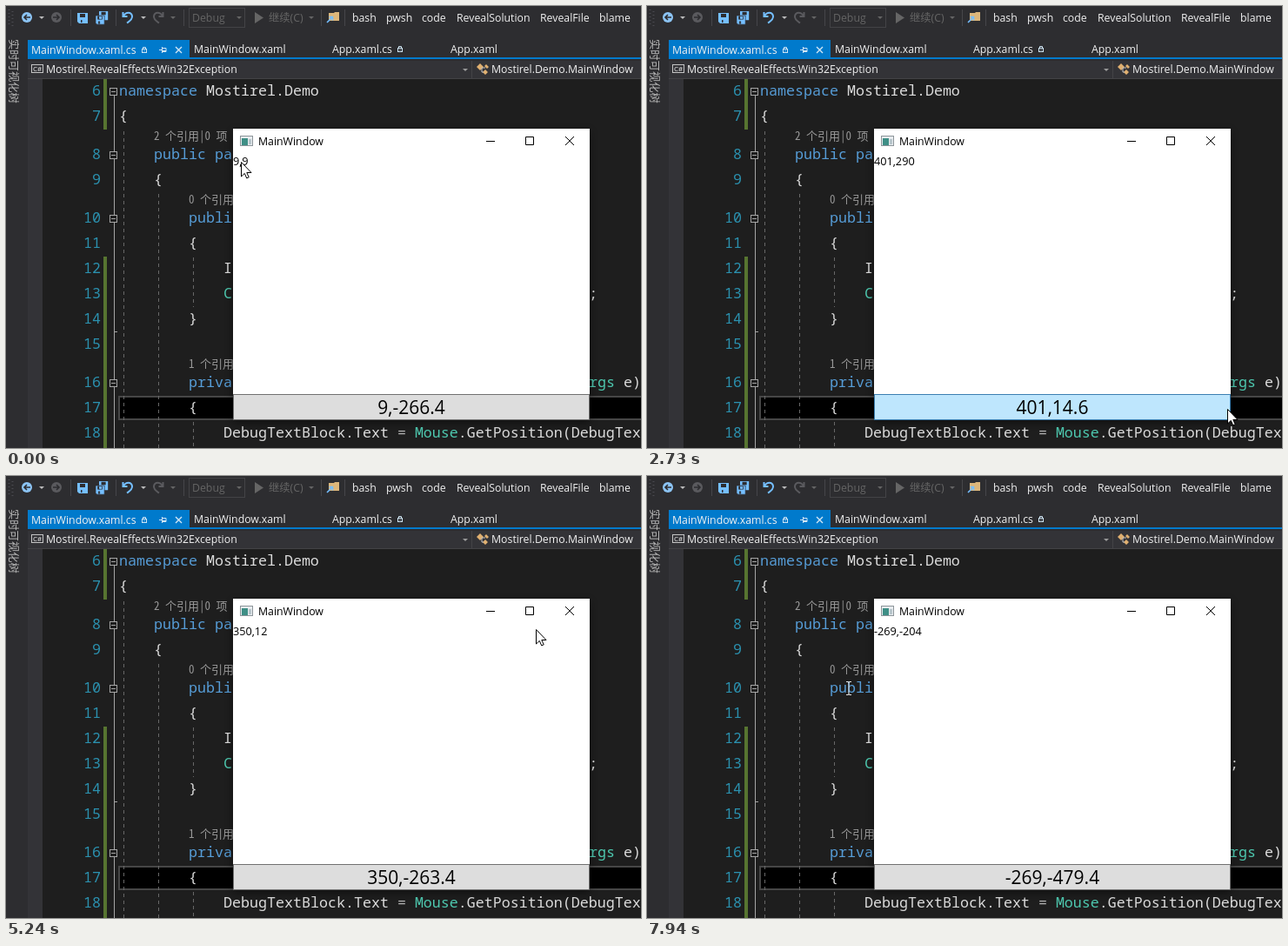
An HTML page for the animation above (8000 ms loop, 730 by 508 pixels).

```html
<!DOCTYPE html>
<html lang="zh-CN">
<head>
<meta charset="utf-8">
<title>Mouse position demo</title>
<style>
html, body { margin: 0; width: 100%; height: 100%; overflow: hidden; background: #2d2d30; }
svg { display: block; }
text { white-space: pre; }
.ui { font: 12.3px "Open Sans", "Noto Sans CJK SC", "Noto Sans CJK", sans-serif; fill: #f1f1f1; }
.code { font: 16.67px "Noto Sans Mono", "DejaVu Sans Mono", monospace; fill: #dcdcdc; }
.lens { font: 13px "Noto Sans Mono CJK SC", "Noto Sans CJK SC", "Noto Sans CJK", monospace; fill: #999; }
.num { fill: #2b91af; text-anchor: end; }
.kw { fill: #569cd6; }
.type { fill: #4ec9b0; }
.op { fill: #b4b4b4; }
.off { fill: #656565; }
.dark { fill: #000; }
.line { fill: none; stroke: #000; }
.pale { fill: none; stroke: #d0e6f5; }
#small { font-size: 12.7px; }
#big { font-size: 21px; text-anchor: middle; }
</style>
</head>
<body>
<svg width="730" height="508" viewBox="0 0 730 508">
  <defs>
    <path id="drop" d="M0 0h6l-3 3z"/>
    <path id="disk" d="M0 0h12v12h-10l-2-2zM3 1v4h6v-4zM4 8v3h1.500v-3z" fill-rule="evenodd"/>
    <g id="lock" class="pale"><rect x=".5" y="3.5" width="5" height="4"/><path d="M1.500 3.500v-2h3v2M3 5v1"/></g>
    <g id="fold" stroke="#a5a5a5" fill="#1e1e1e"><rect x="119.500" y="-4.500" width="8" height="8"/><path d="M121 -.500h5"/></g>
    <filter id="shade" x="-10%" y="-10%" width="120%" height="120%"><feGaussianBlur stdDeviation="5"/></filter>
  </defs>

  <rect width="730" height="508" fill="#2d2d30"/>

  <!-- toolbar -->
  <path d="M3.500 4v19M7.500 6v19" stroke="#4b4b50" stroke-width="2" stroke-dasharray="1 3"/>
  <circle cx="24" cy="13" r="6" fill="#8cc4f5"/>
  <path d="M28 13h-7M24 10l-3 3 3 3" fill="none" stroke="#2d2d30" stroke-width="1.600"/>
  <circle cx="58" cy="13" r="6" fill="#5a5a5e"/>
  <path d="M54 13h7M58 10l3 3-3 3" fill="none" stroke="#2d2d30" stroke-width="1.600"/>
  <path d="M74.500 4v19M126.500 4v19M204.500 4v19M362.500 4v19M389.500 4v19" stroke="#46464a"/>
  <g fill="#75bfff">
    <use href="#disk" x="82" y="8"/>
    <use href="#disk" transform="translate(107 6) scale(.85)"/>
    <use href="#disk" transform="translate(103 11) scale(.85)" stroke="#2d2d30" stroke-width=".8"/>
  </g>
  <g fill="none" stroke-width="2">
    <path d="M134.500 7v5h5M135 11.500c3-5 9-5 10 0c.6 4-3 6-6 8" stroke="#75bfff"/>
    <path d="M180.500 7v5h-5M180 11.500c-3-5-9-5-10 0c-.6 4 3 6 6 8" stroke="#5a5a5e"/>
  </g>
  <g fill="#bbb">
    <use href="#drop" x="38" y="12"/><use href="#drop" x="155" y="12"/>
  </g>
  <g fill="#656565">
    <use href="#drop" x="189" y="12"/><use href="#drop" x="265" y="12"/><use href="#drop" x="348" y="12"/>
    <path d="M286 7v13l10-6.500z"/>
  </g>
  <rect x="210.500" y="2.500" width="64" height="22" fill="none" stroke="#434346"/>
  <path d="M371 8h6l1-1h5v10h-12z" fill="#dcb67a"/>
  <path d="M369 19l6-6M371.500 12.500h4v4" fill="none" stroke="#75bfff" stroke-width="1.600"/>
  <g class="ui">
    <text class="off" x="214" y="18">Debug</text><text class="off" x="302" y="18">继续(C)</text>
    <text x="398" y="18">bash</text><text x="437" y="18">pwsh</text><text x="478" y="18">code</text>
    <text x="518" y="18">RevealSolution</text><text x="614" y="18">RevealFile</text><text x="682" y="18">blame</text>
  </g>

  <!-- tabs and navigation bar -->
  <path d="M25 39h186v20h519v2h-705z" fill="#007acc"/>
  <g class="ui">
    <text x="29" y="54.500">MainWindow.xaml.cs</text><text x="216" y="54">MainWindow.xaml</text>
    <text x="375" y="54">App.xaml.cs</text><text x="511" y="54">App.xaml</text>
  </g>
  <use href="#lock" x="156" y="46"/><use href="#lock" x="450" y="45"/>
  <path class="pale" d="M176 50.500h3M179.500 47v7M180 48.500h4v4h-4M180 51.500h4"/>
  <path class="pale" d="M195 47l7 7M202 47l-7 7" stroke-width="1.400"/>
  <rect x="25" y="63" width="705" height="21" fill="#333337"/>
  <path d="M25 83.500h705M535.500 63v20" stroke="#434346"/>
  <rect x="29.500" y="67.500" width="13" height="9" fill="none" stroke="#c5c5c5"/>
  <text x="31" y="75" class="ui" style="font-size:8px">C#</text>
  <g class="ui"><text x="46" y="77">Mostirel.RevealEffects.Win32Exception</text><text x="558" y="77">Mostirel.Demo.MainWindow</text></g>
  <use href="#drop" x="525" y="72" fill="#999"/>
  <path d="M541 70l4-4 4 4-4 4zM548 76l3-3 3 3-3 3zM550 69l2-2 3 3-2 2z" fill="#e0b070"/>
  <path d="M547 71h4M547 71v5h2" fill="none" stroke="#c5c5c5"/>
  <text class="ui" transform="translate(4 38) rotate(90)" style="fill:#b8b8b8">实时可视化树</text>

  <!-- editor -->
  <rect x="25" y="84" width="17" height="424" fill="#333337"/>
  <rect x="42" y="84" width="688" height="424" fill="#1e1e1e"/>
  <path d="M112 84h4v58h-4zM112 288h4v220h-4z" fill="#577430"/>
  <rect x="130" y="449" width="620" height="26" fill="#000" stroke="#464646" stroke-width="2"/>
  <path d="M124.500 97v411M124 374.500h4" stroke="#a5a5a5"/>
  <use href="#fold" y="99"/><use href="#fold" y="172"/><use href="#fold" y="245"/><use href="#fold" y="434"/>
  <path d="M135.500 144v364M175.500 216v292M215.500 289v57M215.500 478v30" stroke="#686868" stroke-dasharray="4 4"/>
  <g id="nums" class="code"></g>
  <g class="code">
    <text x="130" y="103"><tspan class="kw">namespace</tspan> Mostirel.Demo</text>
    <text x="130" y="132">{</text>
    <text x="170" y="176" class="kw">public partial</text>
    <text x="170" y="205">{</text>
    <text x="210" y="249" class="kw">public</text>
    <text x="210" y="278">{</text>
    <text x="250" y="307">InitializeComponent</text>
    <text x="250" y="336" class="type">CompositionTarget</text><text x="670" y="336">;</text>
    <text x="210" y="365">}</text>
    <text x="210" y="438" class="kw">private</text>
    <text x="670" y="438"><tspan class="type">rgs</tspan> e)</text>
    <text x="210" y="467">{</text>
    <text x="250" y="496">DebugTextBlock.Text <tspan class="op">=</tspan> <tspan class="type">Mouse</tspan>.GetPosition(DebugTextBlock</text>
  </g>
  <g class="lens">
    <text x="170" y="154">2 个引用|0 项</text><text x="210" y="227">0 个引用</text><text x="210" y="416">1 个引用</text>
  </g>
  <rect id="caret" x="220" y="448" width="1" height="28" fill="#fff"/>

  <!-- demo window -->
  <rect x="261" y="144" width="410" height="335" fill="#000" opacity=".45" filter="url(#shade)"/>
  <rect x="261" y="141" width="410" height="335" fill="#fff"/>
  <rect id="maxBg" x="580" y="141" width="46" height="29" fill="#e5e5e5"/>
  <rect id="closeBg" x="626" y="141" width="45" height="29" fill="#e81123"/>
  <rect x="269.500" y="149.500" width="14" height="11" fill="#e8ecef" stroke="#8c9499"/>
  <rect x="271" y="152" width="7" height="8" fill="#3f8f86"/>
  <path d="M279 153h3v6h-3z" fill="#b9c6cc"/>
  <text class="ui dark" x="290" y="160">MainWindow</text>
  <path class="line" d="M552 155.500h10M597.500 150.500h9v9h-9z"/>
  <path id="cross" class="line" d="M643 150l10 10M653 150l-10 10"/>
  <text id="small" class="ui dark" x="261" y="183"></text>
  <rect id="button" x="261.500" y="446.500" width="409" height="29"/>
  <text id="big" class="ui dark" x="466" y="469"></text>

  <g id="pointer">
    <path id="arrow" d="M.500 .500V17l3.800-3.600 2.400 5.500 2.500-1.100-2.400-5.300h5.200z" fill="#fff" stroke="#000"/>
    <path id="resize" d="M-10.500 .5l4.500-4.500v3.500h12v-3.500l4.500 4.500-4.500 4.500v-3.500h-12v3.500z" fill="#fff" stroke="#000"/>
    <path id="beam" d="M-3 -7.500h2.500l.500 1 .500-1h2.500M-3 7.500h2.500l.500-1 .500 1h2.500M0 -7v14" fill="none" stroke="#e4e4e4"/>
  </g>
</svg>
<script>
const LOOP = 8000, LAG = 75, BLINK = 524, BLINK_START = 65;
const WIN = { left: 261, top: 141, client: 170, right: 671, bottom: 476 };
const $ = id => document.getElementById(id);
const show = (id, on) => $(id).setAttribute('visibility', on ? 'visible' : 'hidden');

// time, x, y of the pointer's hot spot
const path = [
  [0, 270, 179], [230, 270, 179], [700, 322, 232], [1195, 380, 287], [1270, 389, 295],
  [1560, 465, 340], [1870, 586, 405], [2195, 634, 432], [2270, 636, 434], [2730, 667, 463],
  [2820, 673, 465], [3170, 673, 465], [3280, 674, 450], [3400, 674, 450], [3840, 675, 409],
  [3980, 668, 400], [4220, 653, 370], [4700, 632, 262], [5165, 611, 182], [5240, 609, 176],
  [5470, 614, 156], [5800, 614, 156], [6300, 647, 155], [6640, 647, 155], [7000, 610, 178],
  [7300, 500, 205], [7470, 410, 222], [7720, 290, 240], [7900, 232, 244], [8000, 232, 244]
];

const slope = (i, k) => (path[i + 1][k] - path[i][k]) / (path[i + 1][0] - path[i][0]);

// Harmonic mean of the neighbouring slopes: smooth, never overshoots.
function tangent(i, k) {
  if (i === 0 || i === path.length - 1) return 0;
  const a = slope(i - 1, k), b = slope(i, k);
  return a * b > 0 ? 2 * a * b / (a + b) : 0;
}

function pointerAt(t) {
  t = Math.max(0, t);
  let i = 0;
  while (i < path.length - 2 && t >= path[i + 1][0]) i++;
  const d = path[i + 1][0] - path[i][0], u = (t - path[i][0]) / d, v = 1 - u;
  return [1, 2].map(k =>
    v * v * (1 + 2 * u) * path[i][k] + u * u * (3 - 2 * u) * path[i + 1][k] +
    d * u * v * (v * tangent(i, k) - u * tangent(i + 1, k)));
}

const inside = (x, y, l, t, r, b) => x >= l && x < r && y >= t && y < b;
const inClient = (x, y) => inside(x, y, WIN.left, WIN.client, WIN.right, WIN.bottom);

function draw(t) {
  const [x, y] = pointerAt(t).map(Math.round);
  const inWindow = inside(x, y, WIN.left, WIN.top, WIN.right, WIN.bottom);
  const onEdge = !inWindow && inside(x, y, WIN.left - 8, WIN.top, WIN.right + 8, WIN.bottom);
  $('pointer').setAttribute('transform', `translate(${x} ${y})`);
  show('arrow', inWindow);
  show('resize', onEdge);
  show('beam', !inWindow && !onEdge);

  const onClose = inside(x, y, 626, 141, 671, 170);
  show('closeBg', onClose);
  show('maxBg', inside(x, y, 580, 141, 626, 170));
  $('cross').style.stroke = onClose ? '#fff' : '#000';

  const hot = inside(x, y, 261, 446, 671, 476);
  $('button').setAttribute('fill', hot ? '#bee6fd' : '#ddd');
  $('button').setAttribute('stroke', hot ? '#3c7fb1' : '#707070');

  // The labels trail the pointer slightly.
  const [px, py] = pointerAt(t - LAG).map(Math.round);
  const [mx, my] = inClient(px, py) ? [px - WIN.left, py - WIN.client] : [-269, -204];
  $('small').textContent = `${mx},${my}`;
  $('big').textContent = `${mx},${(my - 275.4).toFixed(1)}`;

  show('caret', t >= BLINK_START && Math.floor((t - BLINK_START) / BLINK) % 2 === 0);
}

// Each reference-count row pushes the following lines down.
let numY = 103;
for (let n = 6; n <= 18; n++) {
  if (n === 8 || n === 10 || n === 16) numY += 15;
  $('nums').insertAdjacentHTML('beforeend', `<text class="num" x="109" y="${numY}">${n}</text>`);
  numY += 29;
}

const start = performance.now();
function frame() {
  draw((performance.now() - start) % LOOP);
  requestAnimationFrame(frame);
}
frame();
</script>
</body>
</html>
```
